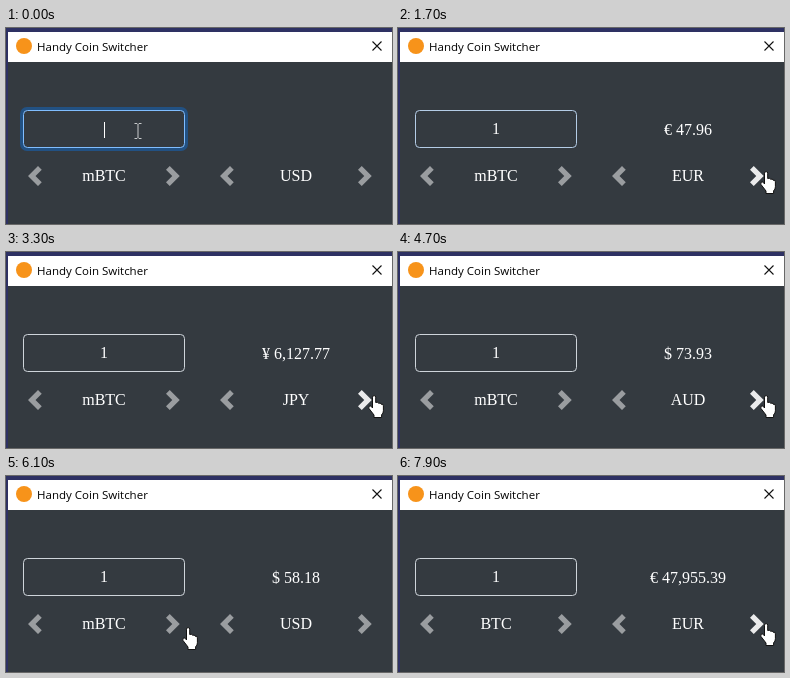
Animation of 386x196 px, one loop 8000 ms. Source, as an HTML page:

```html
<!DOCTYPE html>
<html lang="en">
<head>
<meta charset="utf-8">
<title>Handy Coin Switcher</title>
<style>
html, body { margin: 0; width: 100%; height: 100%; overflow: hidden; background: #343a40; }
svg { display: block; }
text { font: 16px "Liberation Serif", "Times New Roman", serif; fill: #fff; text-anchor: middle; }
#title { font: 11.5px "Open Sans", sans-serif; fill: #000; text-anchor: start; }
#pointer path { fill: #fff; stroke: #111; stroke-width: 1; stroke-linejoin: round; }
#pointer #beam { fill: none; stroke: #c8cacc; }
</style>
</head>
<body>
<svg width="386" height="196" viewBox="0 0 386 196">
  <rect width="386" height="196" fill="#2e3163"/>
  <rect x="2" y="4" width="384" height="30" fill="#fff"/>
  <rect x="2" y="34" width="384" height="162" fill="#343a40"/>
  <circle cx="18" cy="18" r="8" fill="#f7931a"/>
  <text id="title" x="31" y="23">Handy Coin Switcher</text>
  <path d="M366.5 13.5l9 9m0-9l-9 9" stroke="#111" stroke-width="1.1"/>

  <rect id="glow" x="16" y="81" width="164" height="40" rx="5" fill="none" stroke="#007bff" stroke-width="4"/>
  <rect id="field" x="17.5" y="82.5" width="161" height="37" rx="4" fill="#343a40"/>
  <text id="amount" x="98" y="106"></text>
  <path id="caret" d="M0 94v16" stroke="#fff"/>
  <text id="value" x="290" y="107"></text>
  <text id="unit" x="98" y="153"></text>
  <text id="currency" x="290" y="153"></text>
  <g id="arrows" fill="#fff"></g>

  <g id="pointer">
    <path id="beam" d="M-3.5-7.5h2.5l1 1 1-1h2.5M0-6.5v13M-3.5 7.5h2.5l1-1 1 1h2.5"/>
    <path id="arrow" d="M0 0V16L3.7 12.5 6.2 18.5 8.8 17.4 6.3 11.6H11.5Z"/>
    <path id="hand" transform="translate(-6 0)" d="M4.5 13V2.2a1.6 1.6 0 0 1 3.2 0V7.5q2.4-1 2.8.8 2.2-.8 2.6.9 2.3-.4 2.3 1.6v5q0 2.5-1.8 4V22.5H6V20L1 13.5q-1-2.5 1.2-2.6 1.2.1 2.3 2.1z"/>
  </g>
</svg>
<script>
const LOOP = 8000, STEP = 100;
const TYPED = 1300, BLUR = 1500, UNIT_CLICK = 6300;
const $ = id => document.getElementById(id);
const clamp = v => Math.max(0, Math.min(1, v));

// time, x, y of the pointer's hot spot
const path = [
  [0, 132, 103], [600, 262, 131], [700, 262, 131], [1100, 349, 142],
  [1300, 372, 145], [1400, 377, 145], [1500, 368, 143], [5800, 368, 143],
  [6100, 182, 151], [6200, 174, 150], [6600, 174, 150], [7200, 368, 147], [LOOP, 368, 147]
];

// time, currency, converted value
const rates = [
  [0, 'USD', ''], [TYPED, 'USD', '$ 58.18'], [1700, 'EUR', '€ 47.96'],
  [2400, 'GBP', '£ 41.16'], [3000, 'JPY', '¥ 6,127.77'], [3900, 'CAD', '$ 72.21'],
  [4700, 'AUD', '$ 73.93'], [5000, 'NZD', '$ 80.32'], [5500, 'USD', '$ 58.18'],
  [UNIT_CLICK, 'USD', '$ 58,178.94'], [7400, 'EUR', '€ 47,955.39']
];

const buttons = [22, 160, 214, 352].map((x, i) => {
  const p = document.createElementNS('http://www.w3.org/2000/svg', 'path');
  p.setAttribute('d', i % 2 ? 'M1.5 0L0 1.5 2.5 4 0 6.5 1.5 8l4-4z' : 'M4 0L0 4l4 4 1.5-1.5L3 4l2.5-2.5z');
  p.setAttribute('transform', `translate(${x} 138) scale(2.5)`);
  $('arrows').append(p);
  return { x, p };
});

function pointerAt(t) {
  const i = Math.max(1, path.findIndex(k => k[0] >= t));
  const [t0, x0, y0] = path[i - 1], [t1, x1, y1] = path[i];
  const f = clamp((t - t0) / (t1 - t0));
  return { x: x0 + (x1 - x0) * f, y: y0 + (y1 - y0) * f };
}

const over = (b, { x, y }) => x >= b.x && x <= b.x + 27 && y > 136 && y < 160;
const show = (id, on) => $(id).setAttribute('visibility', on ? 'visible' : 'hidden');

function draw(t) {
  const pos = pointerAt(t), before = pointerAt(Math.max(0, t - STEP));
  const inField = pos.x < 179 && pos.y < 120;
  const onButton = buttons.some(b => over(b, pos));
  $('pointer').setAttribute('transform', `translate(${pos.x} ${pos.y})`);
  show('beam', inField);
  show('hand', onButton);
  show('arrow', !inField && !onButton);
  for (const b of buttons) b.p.setAttribute('opacity', over(b, before) ? 0.9 : 0.5);

  const [, currency, value] = rates.findLast(r => r[0] <= t);
  $('currency').textContent = currency;
  $('value').textContent = value;
  $('unit').textContent = t < UNIT_CLICK ? 'mBTC' : 'BTC';
  $('amount').textContent = t < TYPED ? '' : '1';

  const blur = clamp((t - BLUR) / 300);
  const mix = (a, b) => a + (b - a) * blur;
  $('field').setAttribute('stroke', `rgb(${mix(128, 206)},${mix(189, 212)},${mix(255, 218)})`);
  $('glow').setAttribute('opacity', 0.35 * clamp(1 - (t - BLUR) / 200));
  $('caret').setAttribute('transform', `translate(${t < TYPED ? 98.5 : 103.5})`);
  show('caret', t < BLUR && !(t >= 300 && t < 800));
}

function frame() {
  draw(Math.floor(performance.now() % LOOP / STEP) * STEP);
  requestAnimationFrame(frame);
}
frame();
</script>
</body>
</html>
```
